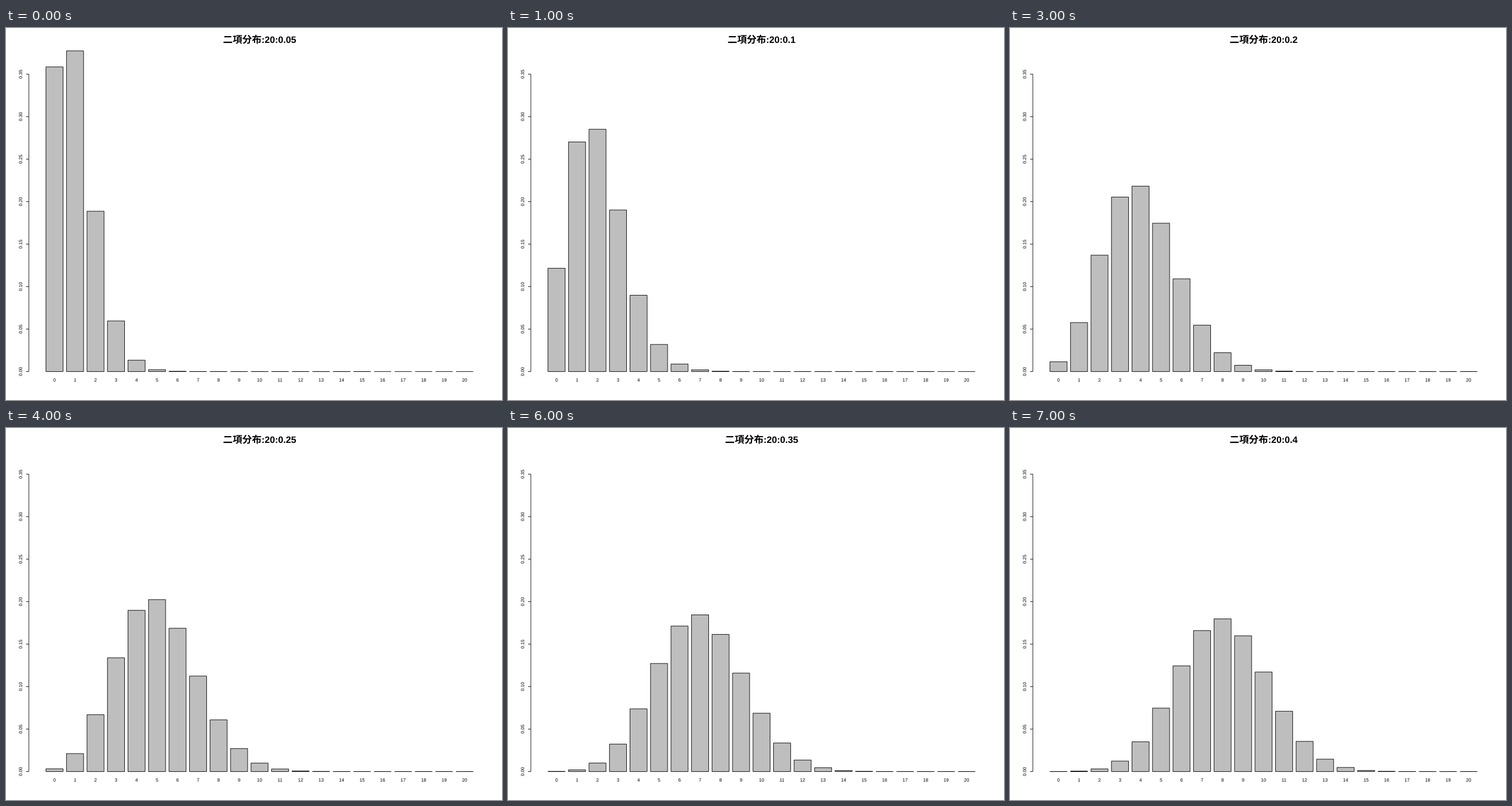
A matplotlib script for the animation above (8000 ms loop, 864 by 648 pixels).

```python
from math import comb

import matplotlib.pyplot as plt
from matplotlib.animation import FuncAnimation
from matplotlib.patches import PathPatch, Rectangle
from matplotlib.textpath import TextPath
from matplotlib.transforms import Affine2D

W, H, DPI = 864, 648, 72
N = 20
STEPS = 8

# Plot region in pixels, measured from the bottom left
LINE = 9.72
LEFT, RIGHT = 4.1 * LINE, W - 2.1 * LINE
BASE, TOP = 5.1 * LINE, H - 4.1 * LINE
UNIT = (RIGHT - LEFT) / 27
STROKE = 0.9
LABEL_SIZE = 8.1
TITLE_SIZE, KANJI_SIZE = 16.2, 16.8

SANS = {"family": "Liberation Sans"}
BOLD = {"family": "Liberation Sans", "weight": "bold"}
KANJI = {"family": "Noto Sans CJK JP", "weight": "bold"}


def binomial(k, p):
    return comb(N, k) * p**k * (1 - p) ** (N - k)


SCALE = (TOP - BASE) / binomial(1, 0.05)


def advance(text, size):
    widths = {".": 0.278, ":": 0.333}
    return size * sum(widths.get(c, 0.556) for c in text)


def place(path, x, y, angle=0):
    return Affine2D().rotate_deg(angle).translate(x, y).transform_path(path)


def label(text, x, y, angle=0):
    path = TextPath((-advance(text, LABEL_SIZE) / 2, 0), text,
                    size=LABEL_SIZE, prop=SANS)
    ax.add_patch(PathPatch(place(path, x, y, angle), fc="black", lw=0))


def line(xs, ys):
    ax.plot(xs, ys, color="black", lw=STROKE, snap=False,
            solid_capstyle="butt")


fig = plt.figure(figsize=(W / DPI, H / DPI), dpi=DPI, facecolor="white")
ax = fig.add_axes([0, 0, 1, 1])
ax.set_xlim(0, W)
ax.set_ylim(0, H)
ax.axis("off")
ax.set_autoscale_on(False)

bars = []
for k in range(N + 1):
    x = LEFT + (1 + 1.2 * k) * UNIT
    bar = Rectangle((x, BASE), UNIT, 0, fc="#bebebe", ec="black",
                    lw=STROKE, snap=False)
    bars.append(ax.add_patch(bar))
    label(str(k), x + UNIT / 2, BASE - 1.8 * LINE)

line([LEFT, LEFT], [BASE, BASE + 0.35 * SCALE])
for i in range(8):
    y = BASE + 0.05 * i * SCALE
    line([LEFT - LINE / 2, LEFT], [y, y])
    label(f"{0.05 * i:.2f}", LEFT - 1.2 * LINE, y, 90)

heading = "二項分布"
kanji_path = TextPath((0, 0), heading, size=KANJI_SIZE, prop=KANJI)
kanji = ax.add_patch(PathPatch(kanji_path, fc="black", lw=0))
numbers = ax.add_patch(PathPatch(kanji_path, fc="black", lw=0))
TITLE_Y = H - 26


def update(i):
    p = 0.05 * (i + 1)
    for k, bar in enumerate(bars):
        bar.set_height(binomial(k, p) * SCALE)

    text = f":{N}:{p:g}"
    kanji_width = KANJI_SIZE * len(heading)
    x = (LEFT + RIGHT - kanji_width - advance(text, TITLE_SIZE)) / 2
    kanji.set_path(place(kanji_path, x, TITLE_Y))
    numbers.set_path(TextPath((x + kanji_width, TITLE_Y), text,
                              size=TITLE_SIZE, prop=BOLD))
    return [*bars, kanji, numbers]


anim = FuncAnimation(fig, update, frames=STEPS, interval=1000,
                     repeat=True, repeat_delay=0, blit=False)
plt.show()
```
